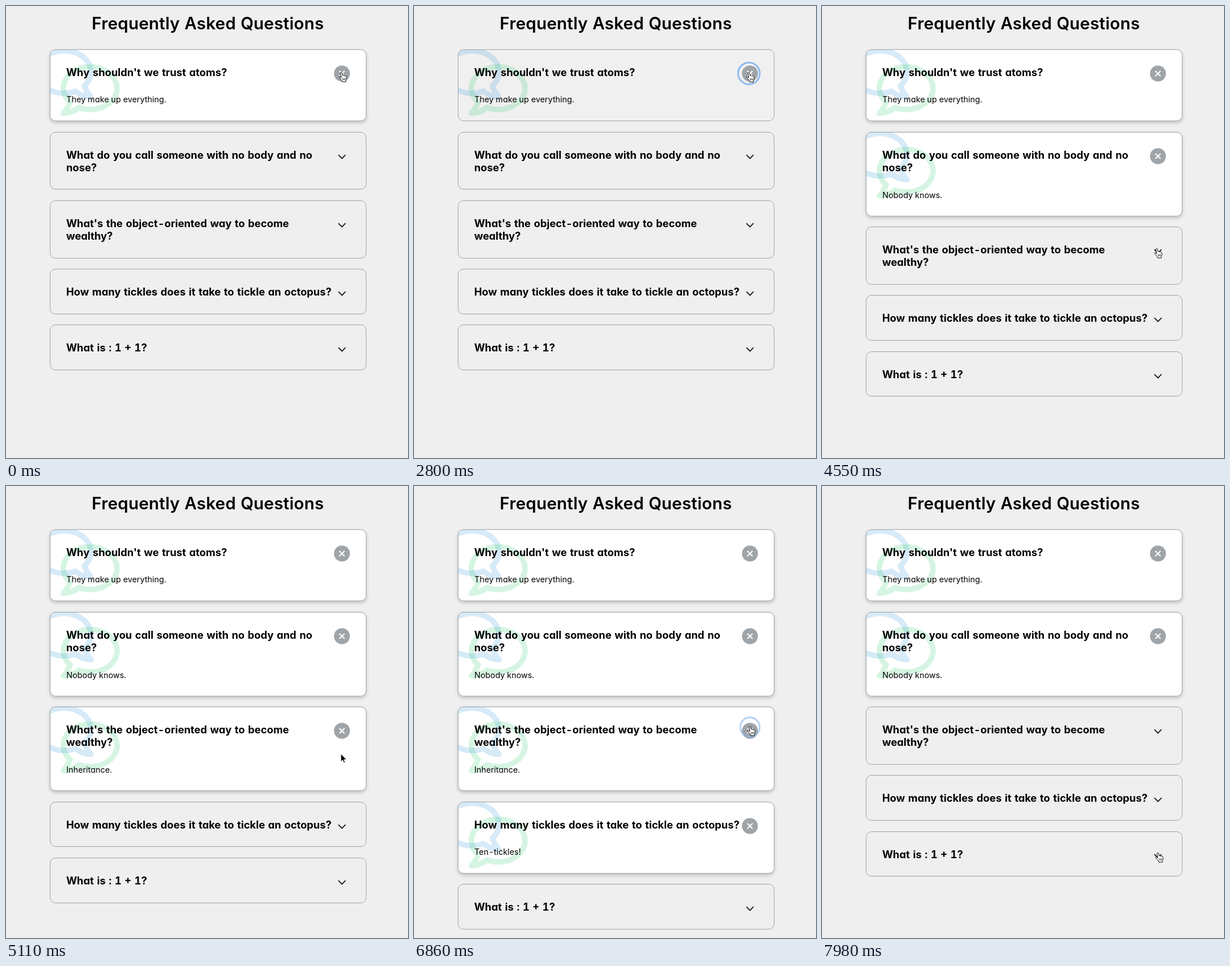
Animation, 706 px wide and 793 px high, one loop 8 s. Source, as an HTML page:

```html
<!DOCTYPE html>
<html lang="en">
<head>
<meta charset="utf-8">
<title>Frequently Asked Questions</title>
<style>
  html, body { margin: 0; width: 100%; height: 100%; overflow: hidden; background: #efefef; }
  body { position: relative; color: #000; }
  h1, h3, p, .card, svg { position: absolute; margin: 0; white-space: pre; }
  h1, h3, p { font-family: Inter, Lato, sans-serif; font-feature-settings: "cv11", "tnum"; font-optical-sizing: none; }
  h1 { left: 0; top: 10px; width: 709px; text-align: center; font-size: 29.5px; line-height: 40px; font-weight: 600; letter-spacing: .18px; }
  h3 { left: 27.7px; top: 28px; font-size: 18.25px; line-height: 22.3px; font-weight: 700; word-spacing: .65px; }
  p { left: 28px; font-size: 14.3px; line-height: 20px; }
  .card { left: 77px; width: 556px; box-sizing: border-box; border: 1px solid #9fa4a8; border-radius: 10px; overflow: hidden; }
  .card svg { left: -1px; top: -1px; }
  .overlay { left: 0; top: 0; }
</style>
</head>
<body>
<h1>Frequently Asked Questions</h1>
<svg width="0" height="0">
  <defs>
    <path id="bubble" d="M256 32C114.6 32 0 125.1 0 240c0 47.6 19.9 91.2 52.9 126.3C38 405.7 7 439.1 6.5 439.5c-6.6 7-8.4 17.2-4.6 26S14.4 480 24 480c61.5 0 110-25.7 139.1-46.3C192 442.8 223.2 448 256 448c141.4 0 256-93.1 256-208S397.4 32 256 32zm0 368c-26.7 0-53.1-4.1-78.4-12.1l-22.7-7.2-19.5 13.8c-14.3 10.1-33.9 21.4-57.5 29 7.3-12.1 14.4-25.7 19.9-40.2l10.6-28.1-20.6-21.8C69.7 314.1 48 282.2 48 240c0-88.2 93.3-160 208-160s208 71.8 208 160-93.3 160-208 160z"/>
  </defs>
</svg>
<script>
const LOOP = 8000, STEP = 70;
const FIRST_TOP = 76.15, GAP = 19.4, LINE = 22.2, ANSWER_HEIGHT = 46.3;
const BUTTON_X = 590, BUTTON_Y = 42.5;
const CLICK_DELAY = 48, FADE = 300, RING_LIFE = 300;

const faqs = [
  ["Why shouldn't we trust atoms?", "They make up everything."],
  ["What do you call someone with no body and no\nnose?", "Nobody knows."],
  ["What's the object-oriented way to become\nwealthy?", "Inheritance."],
  ["How many tickles does it take to tickle an octopus?", "Ten-tickles!"],
  ["What is : 1 + 1?", "2."]
];

// [time of mouse down, card index]
const clicks = [[1950, 0], [2710, 0], [3650, 1], [4620, 2], [5830, 3], [6850, 2], [7420, 3]];

// [time, x, y] of the pointer tip
const path = [
  [0, 589, 118], [2660, 589, 118], [2730, 588.3, 118.3], [3000, 588, 118],
  [3560, 588, 265], [3900, 588, 265], [4480, 588, 427], [4850, 588, 427],
  [5640, 588, 596], [6050, 588, 596], [6320, 622, 520], [6700, 590, 423],
  [6960, 590, 423], [7340, 590, 545], [7560, 590, 545], [7950, 590, 645], [LOOP, 590, 645]
];

const clamp = v => Math.max(0, Math.min(1, v));
const smooth = v => v * v * (3 - 2 * v);

const cards = faqs.map(([question, answer]) => {
  const extraLines = question.split("\n").length - 1;
  const el = document.createElement("div");
  el.className = "card";
  el.innerHTML = `
    <svg width="556" height="150">
      <g class="opened">
        <use href="#bubble" fill="#3498db" opacity=".2" transform="translate(77 -9) scale(-.203 .203)"/>
        <use href="#bubble" fill="#2ecc71" opacity=".2" transform="translate(19 19.5) scale(.203)"/>
        <circle cx="513" cy="42.5" r="14" fill="#9fa4a8"/>
        <path d="M509 38.5l8 8m0-8l-8 8" stroke="#fff" stroke-width="2" stroke-linecap="round"/>
      </g>
      <path class="closed" d="M507.2 40.7l5.8 5.8 5.8-5.8" fill="none" stroke="#222" stroke-width="1.9" stroke-linecap="round" stroke-linejoin="round"/>
    </svg>
    <h3>${question}</h3>
    <p class="opened" style="top:${77.3 + extraLines * LINE}px">${answer}</p>`;
  document.body.append(el);
  return {
    el,
    height: 78.7 + extraLines * LINE,
    opened: el.querySelectorAll(".opened"),
    closed: el.querySelector(".closed")
  };
});

document.body.insertAdjacentHTML("beforeend", `
  <svg class="overlay" width="706" height="793">
    <circle id="ring" fill="none" stroke="#8dbaf0" stroke-width="3"/>
    <g id="cursor" fill="#fff" stroke="#000" stroke-linejoin="round">
      <g id="hand" transform="translate(0 -1)">
        <path d="M-1.5 1C-2-.8 1-1 1.3.8L2.3 5C3 4.2 4.6 4.4 4.8 5.6 5.6 4.8 7 5.2 7.2 6.3 8.3 5.8 9.2 6.8 9.1 8.5 9 11 8.6 12 7.8 13.5V16H1.5L1 14C-.8 12.5-2 10-4 8-4.6 6.8-3 6-1.9 7.2L-.3 8.8Z"/>
        <path d="M2.2 9.5l.3 3.5M4.4 9.5l.1 3.5M6.5 9.5l-.1 3.5" stroke-width=".8"/>
      </g>
      <path id="arrow" d="M0 0V14L3.3 11 5.4 15.8 7.6 14.9 5.5 10.2H10Z" fill="#000" stroke="#fff"/>
    </g>
  </svg>`);
const [ring, cursor, hand, arrow] = ["ring", "cursor", "hand", "arrow"].map(id => document.getElementById(id));

const show = (el, visible) => { el.style.display = visible ? "" : "none"; };

function pointerAt(t) {
  const i = path.findIndex(key => key[0] > t);
  const [t0, x0, y0] = path[i - 1], [t1, x1, y1] = path[i];
  const k = smooth((t - t0) / (t1 - t0));
  return [x0 + (x1 - x0) * k, y0 + (y1 - y0) * k];
}

function cardState(index, t) {
  let open = index === 0, since = -FADE;
  for (const [down, target] of clicks) {
    if (target === index && t >= down + CLICK_DELAY) {
      open = !open;
      since = down + CLICK_DELAY;
    }
  }
  const k = smooth(clamp((t - since) / FADE));
  return { open, lit: open ? k : 1 - k };
}

function render(t) {
  const [px, py] = pointerAt(t);
  let top = FIRST_TOP, overButton = false;

  cards.forEach((card, i) => {
    const { open, lit } = cardState(i, t);
    const bottom = top + card.height + (open ? ANSWER_HEIGHT : 0);
    const y = Math.round(top);
    const shadow = `0 3px 6px rgba(0,0,0,${0.1 * lit})`;
    Object.assign(card.el.style, {
      top: y + "px",
      height: Math.round(bottom) - y + 1 + "px",
      background: `rgba(255,255,255,${lit})`,
      boxShadow: `${shadow}, ${shadow}`
    });
    card.opened.forEach(el => show(el, open));
    show(card.closed, !open);
    overButton ||= Math.hypot(px - BUTTON_X, py - y - BUTTON_Y) < 15;
    top = bottom + GAP;
  });

  cursor.setAttribute("transform", `translate(${px} ${py})`);
  show(hand, overButton);
  show(arrow, !overButton);

  const click = clicks.find(([down]) => t >= down && t < down + RING_LIFE);
  show(ring, click);
  if (click) {
    const age = t - click[0];
    ring.setAttribute("cx", px);
    ring.setAttribute("cy", py);
    ring.setAttribute("r", 16.8 + age * 0.025);
    ring.setAttribute("opacity", age < 90 ? 0.6 + 0.4 * age / 90 : 1 - (age - 90) / (RING_LIFE - 90));
  }
}

function tick(now) {
  const t = now % LOOP;
  render(t - t % STEP);
  requestAnimationFrame(tick);
}
render(0);
requestAnimationFrame(tick);
</script>
</body>
</html>
```
